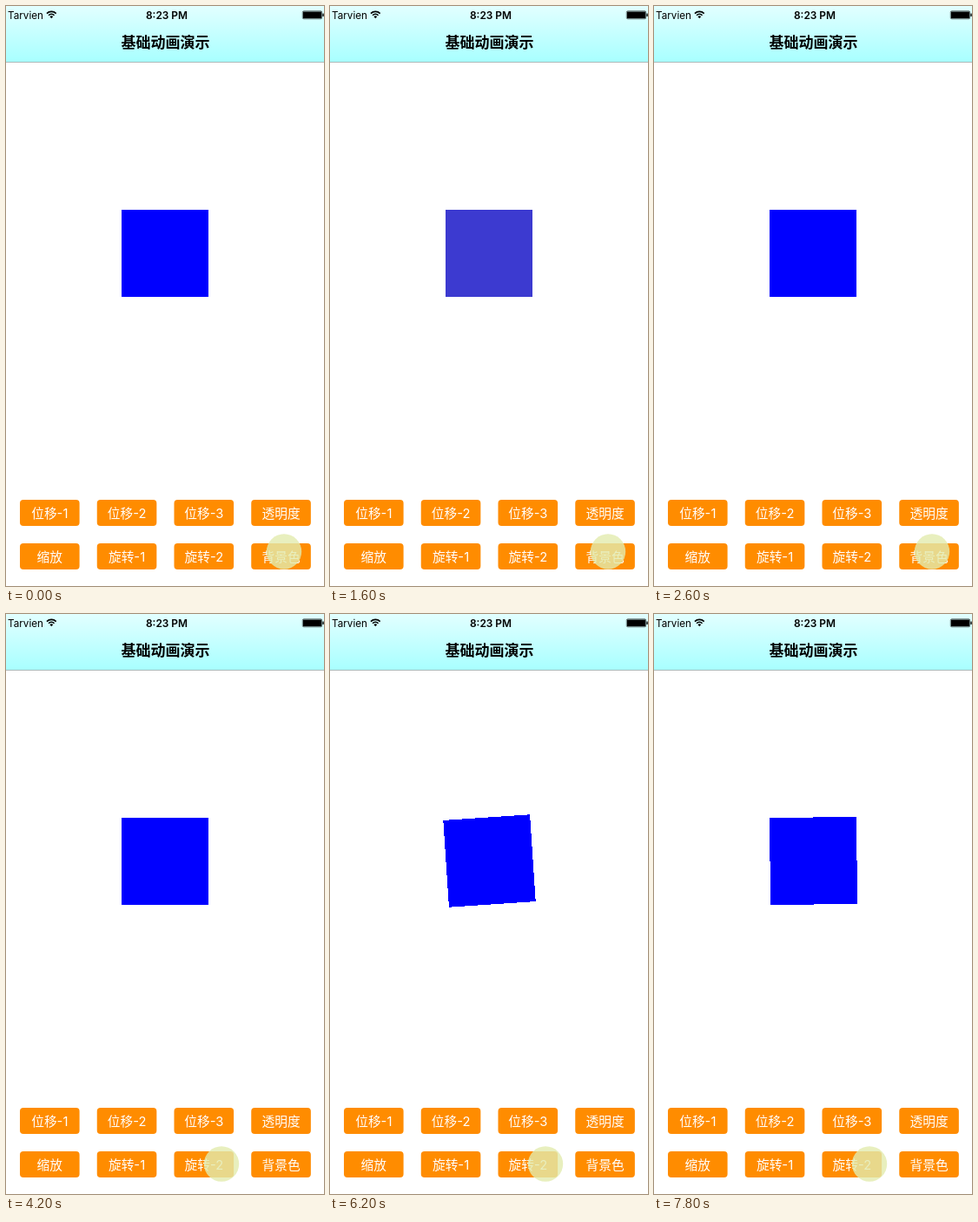
An HTML page with a canvas for the animation above (8000 ms loop, 366x666 px).

```html
<!DOCTYPE html>
<html lang="zh">
<head>
<meta charset="utf-8">
<title>基础动画演示</title>
<style>
  html, body { margin: 0; width: 100%; height: 100%; overflow: hidden; background: #fff; }
  canvas { display: block; }
</style>
</head>
<body>
<canvas id="stage" width="366" height="666"></canvas>
<script>
const ctx = document.getElementById('stage').getContext('2d');
const LOOP = 8000, STEP = 200;
const FONT = 'Inter, "Noto Sans CJK SC", "Noto Sans CJK", sans-serif';
const LABELS = ['位移-1', '位移-2', '位移-3', '透明度', '缩放', '旋转-1', '旋转-2', '背景色'];
const BLUE = [0, 0, 255], GRAY = [138, 133, 147];
const COLOR = { press: 800, start: 870, length: 1575, button: 7 };
const SPIN = { press: 4600, start: 4664, length: 3150, button: 6 };

const clamp = v => Math.min(1, Math.max(0, v));
const mix = (a, b, k) => a + (b - a) * k;

// cubic-bezier(.42, 0, .58, 1)
function ease(u) {
  let lo = 0, hi = 1;
  for (let i = 0; i < 30; i++) {
    const s = (lo + hi) / 2, r = 1 - s;
    const x = 3 * r * r * s * 0.42 + 3 * r * s * s * 0.58 + s * s * s;
    if (x < u) lo = s; else hi = s;
  }
  return lo * lo * (3 - 2 * lo);
}

const progress = (t, a) => ease(clamp((t - a.start) / a.length));

function text(str, x, y, size, weight, align) {
  ctx.font = `${weight} ${size}px ${FONT}`;
  ctx.textAlign = align;
  ctx.fillText(str, x, y);
}

function drawWifi() {
  ctx.lineWidth = 1.6;
  ctx.strokeStyle = '#000';
  for (const r of [4.6, 7.6]) {
    ctx.beginPath();
    ctx.arc(52.3, 14, r, -Math.PI * 0.75, -Math.PI * 0.25);
    ctx.stroke();
  }
  ctx.beginPath();
  ctx.moveTo(52.3, 14.2);
  ctx.arc(52.3, 14, 2.6, -Math.PI * 0.75, -Math.PI * 0.25);
  ctx.fill();
}

function drawBattery() {
  ctx.lineWidth = 0.6;
  ctx.beginPath();
  ctx.roundRect(341.3, 5.8, 22.4, 9, 1.5);
  ctx.stroke();
  ctx.fillRect(342, 6.5, 21, 7.6);
  ctx.fillRect(364.3, 8.6, 1.4, 3.4);
}

function drawHeader() {
  const g = ctx.createLinearGradient(0, 0, 0, 64);
  g.addColorStop(0, '#e2ffff');
  g.addColorStop(1, '#a8ffff');
  ctx.fillStyle = g;
  ctx.fillRect(0, 0, 366, 64);
  ctx.fillStyle = '#a9b9b9';
  ctx.fillRect(0, 64, 366, 1);
  ctx.fillStyle = '#000';
  text('Tarvien', 2, 14.5, 11.7, 400, 'left');
  text('8:23 PM', 185, 14.5, 11.9, 600, 'center');
  text('基础动画演示', 183.5, 48, 17, 600, 'center');
  drawWifi();
  drawBattery();
}

// Title opacity fades back after a press.
function titleAlpha(t, i) {
  const hit = [COLOR, SPIN].find(a => a.button === i);
  return hit && t >= hit.press ? clamp(0.2 + (t - hit.press) / 1000) : 1;
}

function drawButtons(t) {
  LABELS.forEach((label, i) => {
    const x = 16 + (i % 4) * 88.75, y = i < 4 ? 567 : 617;
    ctx.fillStyle = '#ff8c00';
    ctx.beginPath();
    ctx.roundRect(x, y, 68.6, 30, 4);
    ctx.fill();
    ctx.fillStyle = `rgba(255,255,255,${titleAlpha(t, i)})`;
    text(label, x + 34.3, y + 20.5, 14.7, 400, 'center');
  });
}

function drawSquare(t) {
  const k = t < COLOR.start + COLOR.length ? progress(t, COLOR) : 0;
  ctx.fillStyle = `rgb(${BLUE.map((b, i) => Math.round(mix(b, GRAY[i], k)))})`;
  const p = progress(t, SPIN);
  if (p === 0 || t < SPIN.start) {
    ctx.fillRect(133, 234, 100, 100);
    return;
  }
  // Hard-edged rotation, one pixel row at a time.
  const c = Math.cos(p * Math.PI), s = Math.sin(p * Math.PI);
  for (let y = 210; y < 358; y++) {
    let first = -1, last = -1;
    for (let x = 110; x < 258; x++) {
      const dx = x - 183, dy = y - 283;
      if (Math.abs(dx * c + dy * s) < 50 && Math.abs(dy * c - dx * s) < 50) {
        if (first < 0) first = x;
        last = x;
      }
    }
    if (first >= 0) ctx.fillRect(first, y, last - first + 1, 1);
  }
}

function drawTouch(t) {
  const k = ease(clamp((t - 3200) / 1000));
  ctx.fillStyle = 'rgba(227,235,174,0.8)';
  ctx.beginPath();
  ctx.arc(mix(320, 248, k), mix(626.5, 631.5, k) - 7 * Math.sin(Math.PI * k), 20.2, 0, Math.PI * 2);
  ctx.fill();
}

function draw(now) {
  const t = Math.floor((now % LOOP) / STEP) * STEP;
  ctx.fillStyle = '#fff';
  ctx.fillRect(0, 0, 366, 666);
  drawHeader();
  drawSquare(t);
  drawButtons(t);
  drawTouch(t);
}

const begin = performance.now();
function tick() {
  draw(performance.now() - begin);
  requestAnimationFrame(tick);
}
tick();
</script>
</body>
</html>
```
